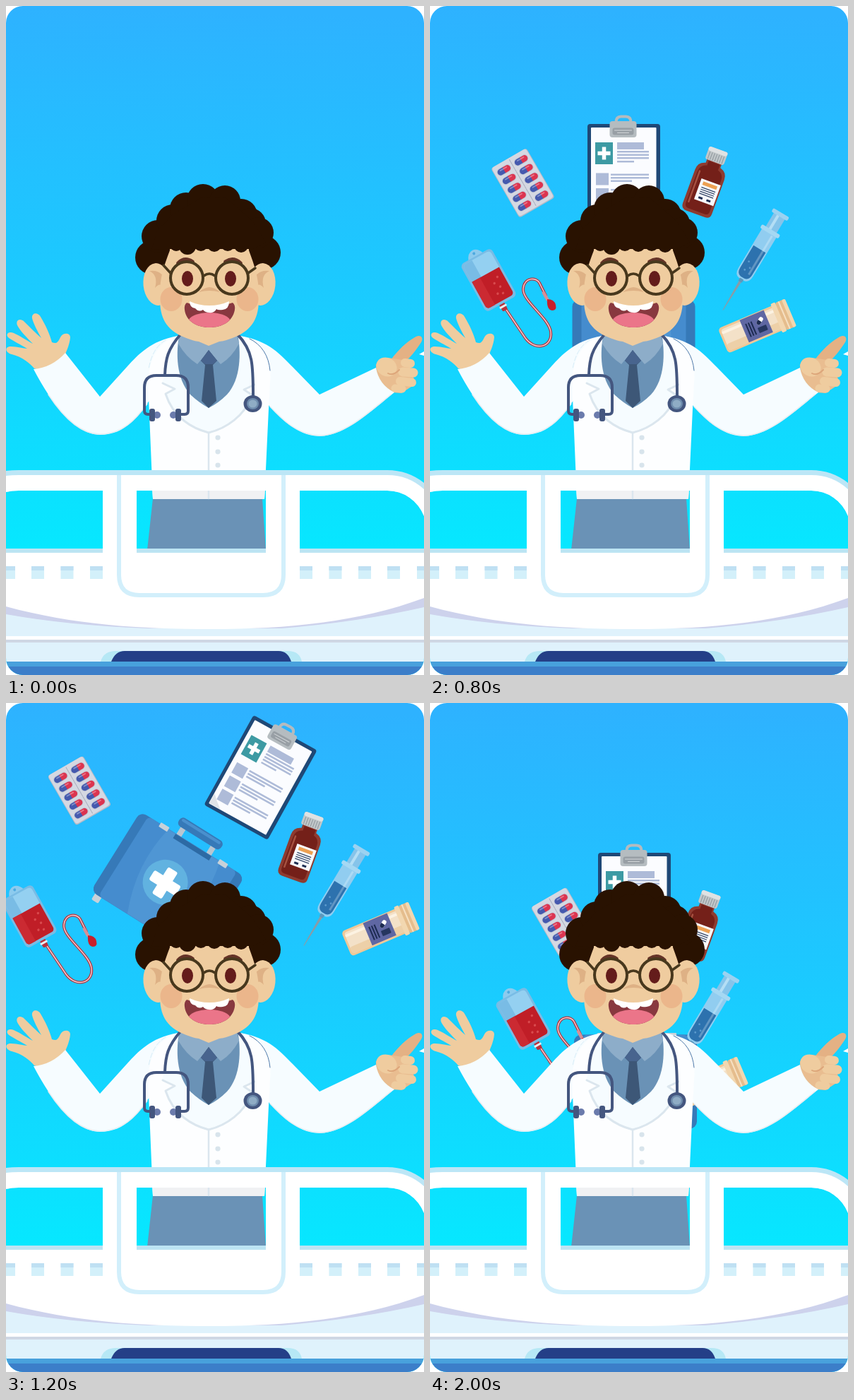
Write an HTML page with a canvas that moves like this. It is 592 px wide and 947 px high and loops after 2.4 s.

```html
<!DOCTYPE html>
<html lang="en">
<head>
<meta charset="utf-8">
<title>Doctor juggling medical supplies</title>
<style>
html, body { margin: 0; width: 100%; height: 100%; overflow: hidden; background: #fff; }
canvas { display: block; width: 592px; height: 947px; }
</style>
</head>
<body>
<canvas id="stage" width="592" height="947"></canvas>
<script>
const W = 592, H = 947, STEP = 400;
const ctx = document.getElementById('stage').getContext('2d');
const SKIN = '#efcc9f', SHADE = '#deb185', HAIR = '#291201', NAVY = '#44567f', BLUE = '#6a92b6';

function fill(d, color, rule) {
  ctx.fillStyle = color;
  ctx.fill(new Path2D(d), rule || 'nonzero');
}
function line(d, color, width) {
  ctx.strokeStyle = color;
  ctx.lineWidth = width;
  ctx.stroke(new Path2D(d));
}
function box(x, y, w, h, color, r = 0) {
  ctx.fillStyle = color;
  ctx.beginPath();
  ctx.roundRect(x, y, w, h, r);
  ctx.fill();
}
function oval(x, y, rx, ry, color, turn = 0) {
  ctx.fillStyle = color;
  ctx.beginPath();
  ctx.ellipse(x, y, rx, ry, turn, 0, 7);
  ctx.fill();
}
function cross(x, y, size, thick, color, r = 0) {
  box(x - size / 2, y - thick / 2, size, thick, color, r);
  box(x - thick / 2, y - size / 2, thick, size, color, r);
}
function clipped(d, draw) {
  ctx.save();
  ctx.clip(new Path2D(d));
  draw();
  ctx.restore();
}

function clipboard() {
  box(-51.5, -72.5, 103, 145, '#1f4876', 4);
  box(-46.5, -67.5, 92.5, 135, '#fbfcff', 1);
  fill('M-46 51 Q-38 60 -28 67 H-46Z', '#dfe3e8');
  box(-40.5, -46.5, 25, 31, '#3d9aa3');
  cross(-28, -31, 18, 5.5, '#fff');
  const ink = '#aebbd8';
  box(-9.5, -46.5, 38, 10, ink);
  [-34.5, -30, -25.5].forEach(y => box(-9.5, y, 45, 2.6, ink));
  box(-9.5, -20.5, 24, 2.4, ink);
  [-3, 18.5, 40].forEach(y => {
    box(-39.5, y, 18, 17, ink);
    box(-18.5, y + 1, 54, 2.6, ink);
    box(-18.5, y + 5.5, 54, 2.6, ink);
    box(-18.5, y + 10, 30, 2.6, ink);
  });
  line('M-11 -75 Q-11 -83 -4 -83 H3 Q10 -83 10 -75', '#b4bbbf', 4);
  box(-20, -76.5, 38, 23, '#b5bcc0', 4);
  box(-16, -67, 30, 10, '#989fa5', 3);
  line('M-13 -63.5 H11 M-9 -60 H7', '#d3d7da', 1);
}

function blister() {
  box(-29, -40.5, 58, 81, '#b4bac8', 4);
  box(-28, -40.5, 56, 79.5, '#d5d8e2', 4);
  ctx.setLineDash([3, 1]);
  line('M0 -38 V38', '#a7adbd', 1);
  ctx.setLineDash([]);
  for (let i = 0; i < 10; i++) {
    const x = i % 2 ? 14 : -14, y = -29 + Math.floor(i / 2) * 14.5;
    box(x - 11, y - 5.5, 22, 11, '#c3c9d6', 5.5);
    box(x - 10, y - 4.5, 11, 9, '#4559ae', [4.5, 0, 0, 4.5]);
    box(x, y - 4.5, 10, 9, '#dc3450', [0, 4.5, 4.5, 0]);
    box(x - 6, y - 3, 12, 1.8, '#ffffff55', 1);
  }
}

function bottle() {
  fill('M-11 -34 H11 V-26 Q22 -23 22 -12 V39 Q22 47 14 47 H-14 Q-22 47 -22 39 V-12 Q-22 -23 -11 -26Z', '#8e3b30');
  fill('M-8 -30 H9 V-22 Q18 -19 18 -10 V37 Q18 43 12 43 H-12 Q-18 43 -18 37 V-10 Q-18 -20 -8 -23Z', '#742019');
  line('M-15 -12 V34', '#a65140', 2.5);
  box(-9, -3, 29, 31, '#f8f9fc');
  box(-5, 0, 21, 5, '#eda052');
  [8, 11, 14, 17].forEach(y => box(-5, y, 21, 1.3, '#334668'));
  box(-4, 22, 6, 3, '#1d2e52');
  box(8, 22, 6, 3, '#1d2e52');
  box(-14, -50, 28, 19, '#c2c8ca', 3);
  box(-14, -50, 28, 6, '#dfe2e3', 3);
  for (let x = -11; x < 13; x += 3.5) box(x, -43, 1.2, 11, '#959da2');
}

function syringe() {
  fill('M-2 28 H2 L0.4 80 H-0.4Z', '#8a9ba6');
  box(-9, -77, 18, 32, '#86c4ea');
  box(-4, -77, 4, 32, '#b4def5');
  box(-13, -81, 26, 6, '#9bd2f1', 2);
  fill('M-12 -48 H12 V17 Q12 28 4 29 H-4 Q-12 28 -12 17Z', '#91cdf0');
  fill('M-10 -21 H10 V16 Q10 25 3 26 H-3 Q-10 25 -10 16Z', '#2d72ae');
  box(4, -46, 3, 64, '#ffffff40');
  box(-15, -53, 30, 6, '#a5d8f3', 2);
  box(-3, 28, 6, 5, '#5d98bd', 1);
  [[-4, 2], [2, 9], [-3, 15]].forEach(([x, y]) => oval(x, y, 1.4, 1.4, '#5b9acc'));
}

function jar() {
  box(-52, -19, 92, 38, '#efc897', 5);
  box(-49, -16, 82, 32, '#f3e1c8', 4);
  box(-49, 6, 82, 10, '#edd0a8', 3);
  box(-49, -13, 82, 4, '#fcf2e2', 2);
  box(-19, -18, 37, 34, '#5f67a3');
  [-14, -10, -6].forEach(x => box(x, -10, 2, 20, '#1d2b51'));
  box(0, 2, 13, 8, '#26365f', 1);
  ctx.save();
  ctx.translate(7, -6);
  ctx.rotate(-0.6);
  box(-6, -3, 12, 6, '#fff', 3);
  box(-6, -3, 6, 6, '#1d2b51', [3, 0, 0, 3]);
  ctx.restore();
  box(30, -22, 7, 44, '#f2d7b0', 2);
  box(37, -21, 14, 42, '#e5bd8d', 2);
  box(41, -21, 2, 42, '#f6e0c1');
  box(47, -21, 5, 42, '#f2d7b0', 2);
}

function bloodBag() {
  const tube = 'M25 42 L52 82 C67 102 91 94 88 73 C85 53 47 29 49 12 C51 -5 68 -4 72 4 L81 22';
  line(tube, '#b9323c', 4);
  line(tube, '#eed3d6', 1.4);
  line('M78 18 L83 27', '#d78f96', 4.5);
  fill('M83 27 Q93 27 95 35 Q97 43 90 43 Q82 42 83 27Z', '#c91f2b');
  ctx.save();
  ctx.rotate(-29 * Math.PI / 180);
  box(-4, 36, 8, 13, '#b9323c', 2);
  box(-5.5, 41, 11, 3, '#e8edf1', 1);
  fill('M-12 -37 Q-8 -48 0 -48 Q8 -48 12 -37Z', '#8dcbee');
  oval(0, -43, 2, 2, '#4da9df');
  box(-25, -38.5, 50, 77, '#79bce5', 6);
  box(-22, -36, 44, 71, '#94d0f1', 5);
  box(-22, -36, 15, 45, '#79bce5', [5, 0, 0, 0]);
  box(-22, -9, 44, 44, '#c01e27', [0, 0, 5, 5]);
  box(-22, -9, 13, 44, '#cb2a32', [0, 0, 0, 5]);
  [[5, 8], [10, 16], [2, 23], [13, 2], [9, 26]].forEach(([x, y]) => oval(x, y, 1.7, 1.7, '#d94a4e'));
  ctx.restore();
}

function firstAidCase() {
  box(-27, -82, 8, 17, '#b9c6d1', 1);
  box(23, -82, 8, 17, '#b9c6d1', 1);
  box(-34, -92, 71, 14, '#3679b8', 6);
  box(-31, -90, 64, 4, '#4a90ce', 2);
  [-80, 68].forEach(x => box(x, 62, 11, 14, '#c7d1d9', 2));
  box(-87, -66.5, 174, 133, '#3679b8', 10);
  box(-74, -66.5, 148, 133, '#458cce', 6);
  fill('M-40 -66 H46 Q62 0 42 66 H-26 Q-54 0 -40 -66Z', '#4f96d4');
  box(-28, -66, 60, 7, '#2d6aa4');
  box(-54, -69, 14, 7, '#c7d1d9', 1);
  box(44, -69, 14, 7, '#c7d1d9', 1);
  oval(-4, 0, 32, 32, '#61b2e0');
  cross(-4, 1, 44, 16, '#fff', 3);
}

// Each item: drawing, then [x, y, degrees] close to the head, midway and far out.
const items = [
  [firstAidCase, [291, 536, 0], [288.5, 482, 0], [229, 256, 32]],
  [clipboard, [289.5, 284.5, 0], [274.5, 239.5, 0], [360.5, 105.5, 29]],
  [blister, [188, 310, -30], [131.5, 250.5, -30], [104, 124, -30]],
  [bottle, [382, 316, 20], [392, 250, 20], [420, 205, 20]],
  [syringe, [386, 455, 31], [456, 362, 31], [463, 275, 31]],
  [jar, [395, 540, -23], [463, 454, -23], [530, 321, -23]],
  [bloodBag, [132, 447, 0], [83, 388, 0], [33, 302, 0]]
];
const reach = [0, 1, 2, 3, 2, 1];

function drawItems(level) {
  for (const item of items) {
    const [x, y, deg] = item[level];
    ctx.save();
    ctx.translate(x, y);
    ctx.rotate(deg * Math.PI / 180);
    item[0]();
    ctx.restore();
  }
}

function hands() {
  fill('M40 513 C34 506 24 497 8 493 C-2 490 -2 482 7 482 C16 482 25 485 30 485 C22 480 8 473 3 469 C-1 464 4 460 11 463 '
    + 'C20 467 32 475 38 478 C30 470 20 460 16 452 C13 445 20 441 26 447 C33 454 44 465 50 470 C45 461 39 450 37 442 '
    + 'C36 434 45 433 49 440 C55 450 62 464 65 476 C70 478 73 478 77 469 C80 462 91 462 91 469 C90 480 86 487 84 493 Q72 515 54 517Z', SKIN);

  fill('M585 493 L592 489 V495Z', '#fff');
  fill('M545 501 C556 486 567 476 579 469 C587 464 592 469 588 476 C581 487 573 497 562 507Z', '#e4b184');
  fill('M524 508 Q527 497 541 498 L570 502 L580 535 L560 548 L547 547 Q523 530 524 508Z', '#e9bd90');
  line('M565 505 L573 506', SKIN, 12);
  line('M562 518 L577 519', SKIN, 13);
  line('M558 531 L575 533', SKIN, 12);
  line('M551 541 L561 542', SKIN, 11);
  oval(539, 511, 15, 13, SKIN, 0.5);
  line('M541 520 Q548 524 557 515', '#dda67a', 2);
}

function body() {
  const leftArm = 'M243 467 C204 474 187 494 172 510 L133 553 L84 491 Q65 512 39 514 C61 556 94 606 133 607 C170 607 188 580 206 554 L230 520Z';
  const rightArm = 'M332 467 C373 474 389 494 406 511 L444 550 L524 512 Q528 536 550 547 C518 572 482 608 444 609 C410 608 387 581 371 564 L350 520Z';
  hands();
  fill(leftArm, '#f6fcff');
  fill(rightArm, '#f6fcff');
  line('M60 550 C85 588 110 606 133 606 C165 606 184 585 200 563', '#e7edf1', 1.5);
  line('M545 550 C512 577 478 608 444 608 C412 607 390 584 374 567', '#e7edf1', 1.5);
  fill('M208 697 L200 770 H368 L363 697Z', BLUE);
  fill('M243 467 Q205 478 201 530 L208 698 H366 L372 570 L375 515 Q371 477 332 467Z', '#fdfeff');
  fill('M207 685 H367 L366 698 H208Z', '#f0f1f3');
  ctx.setLineDash([7, 3]);
  line('M226 473 Q207 484 202 514', '#d7edf8', 1);
  ctx.setLineDash([]);
  line('M345 471 Q371 484 374 516', '#4b78a9', 1);

  fill('M238 470 L221 534 L239 542 L226 549 C237 583 264 598 287 604 C312 598 338 580 349 551 L337 543 L354 534 L337 470Z', '#f6fcff');
  line('M222 534 L239 542 L226 549 C237 583 264 598 287 604 C312 598 338 580 349 551 L337 543 L352 536', '#dbe6ee', 3);
  line('M287 604 V697', '#dbe6ee', 2.5);
  [611, 631, 650].forEach(y => oval(300, y, 3.6, 3.4, '#d8e4ec'));

  fill('M246 464 C240 490 241 528 261 550 Q274 562 287 569 Q301 562 313 550 C333 528 333 490 328 464Z', BLUE);
  fill('M246 466 L244 478 Q255 497 271 507 L287 488 L304 507 Q320 497 330 478 L327 466Z', '#8dadc9');
  fill('M287 487 L276 502 L282 508 L277 559 L287 569 L298 559 L293 508 L299 502Z', '#3d5777');
  fill('M287 487 L276 502 L282 507 H293 L299 502Z', '#48648e');

  line('M247 465 C229 486 226 499 225 522', NAVY, 4);
  line('M328 465 C350 488 350 508 350 552', NAVY, 4);
  line('M206 578 H201 Q196 578 196 573 V540 Q196 523 213 523 H241 Q258 523 258 540 V573 Q258 578 253 578 H246', NAVY, 4);
  [[207, 214], [244, 237]].forEach(([x, tip]) => {
    oval(tip, 579, 5, 5, '#6b7bac');
    box(x - 4, 570, 8, 18, NAVY, 3);
  });
  oval(349.5, 563, 13, 12, NAVY);
  oval(349.5, 563, 8.5, 8, '#6e8cad');
  oval(349.5, 563, 6, 5.5, '#8facc5');
}

function head() {
  oval(207, 356, 24, 24, HAIR);
  oval(365, 349, 24, 24, HAIR);
  box(210, 335, 152, 34, HAIR);
  oval(214, 394, 19.5, 30, SKIN, -0.1);
  oval(362, 394, 19.5, 30, SKIN, 0.1);
  fill('M203 375 Q222 372 228 394 L222 399 Q219 390 211 399 Q216 381 203 375Z', SHADE);
  fill('M373 375 Q354 372 348 394 L354 399 Q357 390 365 399 Q360 381 373 375Z', SHADE);
  fill('M232 335 V346 C223 370 218 384 218 408 C217 438 224 455 248 467 Q264 474 273 475 L287 481 L302 475 Q312 474 328 467 C352 455 359 438 358 408 C358 384 352 368 344 346 V335Z', SKIN);
  oval(234, 415, 15.5, 17, '#ebb68b');
  oval(342, 415, 15.5, 17, '#ebb68b');

  [[215, 326, 23], [236, 304, 23], [255, 287, 23], [279, 275, 23], [310, 276, 22], [333, 296, 23],
   [346, 308, 22], [357, 321, 22], [241, 338, 9], [257, 340, 12], [276, 337, 10], [295, 338, 10],
   [314, 337, 10], [333, 339, 10]].forEach(([x, y, r]) => oval(x, y, r, r, HAIR));
  fill('M206 345 L214 318 L236 295 L279 270 L312 272 L350 305 L368 335 L350 344 H232Z', HAIR);

  line('M244 364 Q253 355 264 362', '#653428', 5.5);
  line('M311 362 Q322 355 332 364', '#653428', 5.5);
  fill('M273 405 Q280 399 288 398 Q297 399 303 405 Q288 401 273 405Z', SHADE);
  oval(257, 386, 8, 11, '#641c1b');
  oval(318, 386, 8, 11, '#641c1b');
  const frame = '#48381d';
  [256, 320].forEach(x => {
    ctx.strokeStyle = frame;
    ctx.lineWidth = 4;
    ctx.beginPath();
    ctx.arc(x, 385, 23, 0, 7);
    ctx.stroke();
  });
  line('M280 382 Q288 376 296 382', frame, 3.5);
  line('M233 378 L223 367 M343 378 L353 371', frame, 3.5);

  const mouth = 'M256 420 Q288 431 321 420 Q325 423 324 430 C321 447 306 455 288 455 C270 455 255 446 253 430 Q252 423 256 420Z';
  fill(mouth, '#88383f');
  clipped(mouth, () => oval(288, 447, 30, 13, '#eb7589'));
  fill('M260 418 Q273 424 288 424 Q303 424 316 418 Q316 429 307 430 Q300 431 298 429 Q295 435 288 434 Q282 434 279 430 Q273 434 268 428 Q260 427 260 418Z', '#fff');
}

function bed() {
  const windows = 'M0 688 Q8 686 18 686 H137 V768 H0Z M185 686 H368 V768 H185Z M416 686 H540 A56 56 0 0 1 592 722 V768 H416Z';
  fill('M0 658 Q8 657 18 657 H540 A84 84 0 0 1 592 675 V840 H0Z ' + windows, '#bce6f6', 'evenodd');
  fill('M0 665 Q8 664 18 664 H540 A77 77 0 0 1 592 684 V840 H0Z ' + windows, '#fff', 'evenodd');
  [[0, 137], [185, 183], [416, 176]].forEach(([x, w]) => box(x, 768, w, 6, '#bce4f3'));
  box(0, 836, W, 92, '#dff2fc');
  fill('M0 836 V861 Q90 877 200 881 H390 Q500 872 592 851 V836Z', '#cdd2ec');
  fill('M0 834 V850 C95 876 190 882 290 882 C400 882 500 872 592 838 V830 H0Z', '#fff');
  line('M160 664 V805 Q160 834 189 834 H364 Q393 834 393 805 V664', '#d2effb', 6);
  for (const x of [-5, 36, 77.5, 119, 416, 457.5, 499, 540, 582]) {
    box(x, 793, 18, 18, '#d3f0fa');
    box(x, 793, 18, 6, '#bfe0f3');
  }
  box(0, 892, W, 5, '#fff');
  box(0, 897, W, 4, '#cfd7e4');
  fill('M134 928 Q138 913 156 913 H399 Q416 913 419 928Z', '#b6e8f5');
  fill('M149 928 Q155 913 168 913 H386 Q399 913 404 928Z', '#243f87');
  box(0, 928, W, 7, '#48a1dc');
  box(0, 935, W, 12, '#3c7ec9');
}

const sky = ctx.createLinearGradient(20, 0, 0, 770);
sky.addColorStop(0, '#2eb2ff');
sky.addColorStop(0.5, '#1bcaff');
sky.addColorStop(1, '#06e8ff');
ctx.lineJoin = 'round';

function draw(level) {
  ctx.clearRect(0, 0, W, H);
  ctx.save();
  ctx.beginPath();
  ctx.roundRect(0, 0, W, H, 24);
  ctx.clip();
  ctx.fillStyle = sky;
  ctx.fillRect(0, 0, W, H);
  ctx.lineCap = 'round';
  if (level) drawItems(level);
  body();
  head();
  ctx.lineCap = 'butt';
  bed();
  ctx.restore();
}

function tick() {
  draw(reach[Math.floor(performance.now() / STEP) % reach.length]);
  requestAnimationFrame(tick);
}
tick();
</script>
</body>
</html>
```
